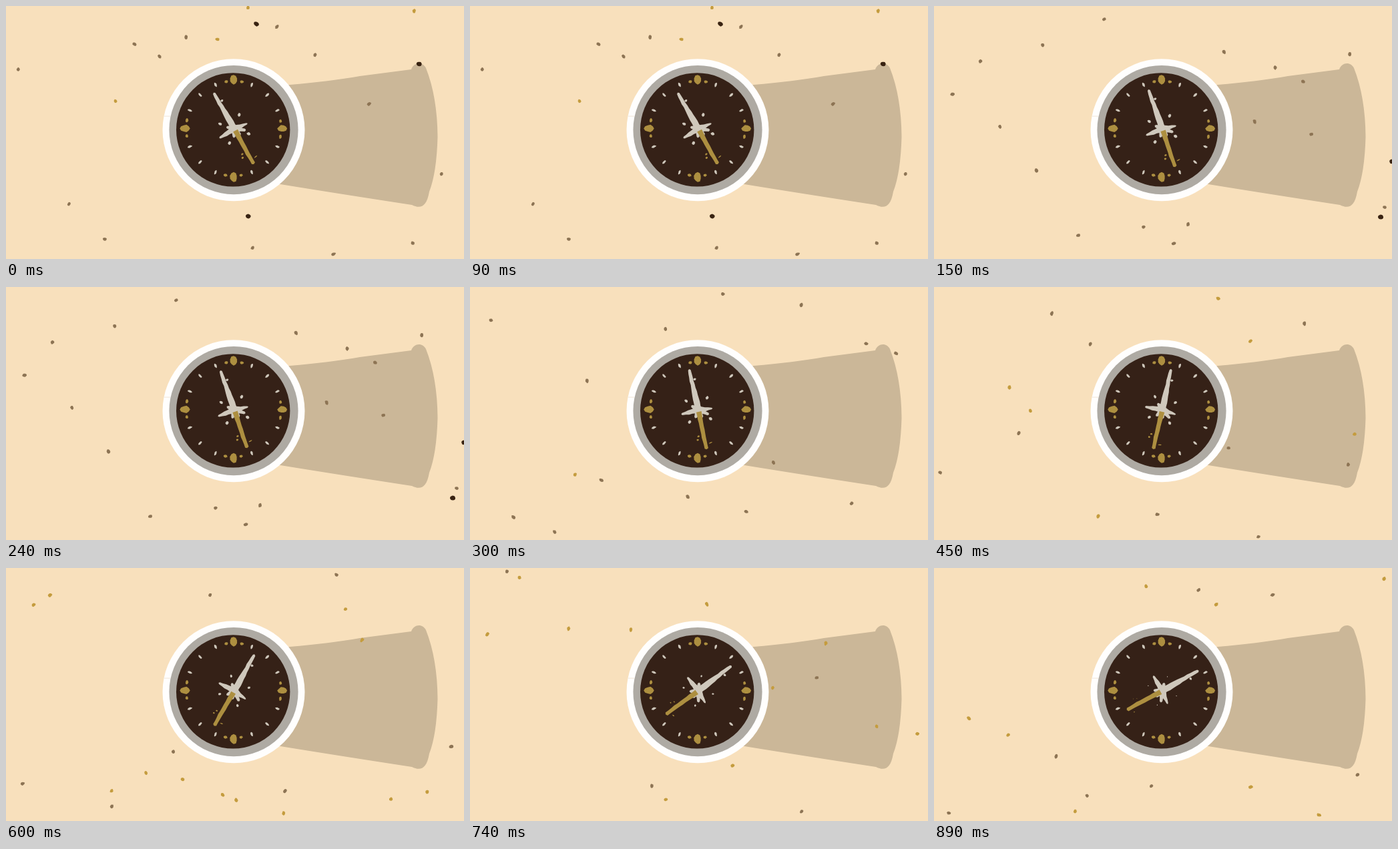
Recreate the animation shown at these times as an HTML page with a canvas. Size 686 by 379 pixels, loop 0.99 s.

```html
<!DOCTYPE html>
<html lang="en">
<head>
<meta charset="utf-8">
<title>Watch</title>
<style>
html, body { margin: 0; width: 100%; height: 100%; overflow: hidden; background: #f8e0bc; }
canvas { display: block; }
</style>
</head>
<body>
<canvas id="stage" width="686" height="379"></canvas>
<script>
const ctx = document.getElementById('stage').getContext('2d');
const W = 686, H = 379, LOOP = 990, TAU = Math.PI * 2;
const SAND = '#f8e0bc', SHADE = '#cbb798', SILVER = '#cfc8bc', GOLD = '#ad8f40';
const BROWN = '#8d7454', AMBER = '#c49c3e', DARK = '#392312';

// The hands jump from pose to pose; fresh grains are scattered with each one.
const poses = [
  { start: 0, angle: -28.8, brown: 13, amber: 4 },
  { start: 150, angle: -18.5, brown: 17, amber: 0 },
  { start: 300, angle: -11.8, brown: 14, amber: 1 },
  { start: 450, angle: 13, brown: 9, amber: 6 },
  { start: 600, angle: 30, brown: 7, amber: 12 },
  { start: 740, angle: 54, brown: 4, amber: 11 },
  { start: 890, angle: 61.7, brown: 7, amber: 8 },
];
poses[0].dark = [[375, 27], [619, 87], [363, 315]];
poses[1].dark = [[686, 233], [669, 316]];

const rad = deg => deg * Math.PI / 180;
const noise = n => {
  const s = Math.sin(n * 12.9898 + 4.1) * 43758.5453;
  return s - Math.floor(s);
};

function fill(points, color) {
  ctx.fillStyle = color;
  ctx.beginPath();
  for (const [x, y] of points) ctx.lineTo(x, y);
  ctx.fill();
}

function disc(x, y, r, color) {
  ctx.fillStyle = color;
  ctx.beginPath();
  ctx.arc(x, y, r, 0, TAU);
  ctx.fill();
}

// Uneven hand-painted dab.
function blob(x, y, rx, ry, turn, color) {
  const points = [], c = Math.cos(turn), s = Math.sin(turn);
  for (let i = 0; i < 10; i++) {
    const a = i * TAU / 10, k = 0.88 + 0.28 * noise(x * 3 + y * 7 + i);
    const u = Math.cos(a) * rx * k, v = Math.sin(a) * ry * k;
    points.push([x + u * c - v * s, y + u * s + v * c]);
  }
  fill(points, color);
}

// Rough-edged strip pointing away from the hub, tapering from half-width w0 to w1.
function limb(turn, from, to, w0, w1, color) {
  const left = [], right = [], steps = Math.ceil((to - from) / 6);
  for (let i = 0; i <= steps; i++) {
    const k = i / steps, y = -from - (to - from) * k, w = w0 + (w1 - w0) * k;
    left.push([-w - noise(turn + i) * 0.9, y]);
    right.unshift([w + noise(turn - i - 1) * 0.9, y]);
  }
  ctx.save();
  ctx.rotate(rad(turn));
  fill([...left, [0, -to - 1.5], ...right], color);
  ctx.restore();
}

// Spreads grains evenly across the stage, keeping clear of the watch.
function scatter(count, seed, color) {
  for (let i = 0; i < count; i++) {
    const x = W * (i + noise(seed + i)) / count;
    let y, tries = 0;
    do y = H * noise(seed + i * 7 + 31 * ++tries);
    while (Math.hypot(x - 341, y - 186) < 112);
    blob(x, y, 2.7 + noise(x) * 0.8, 2.4, noise(y) * 3, color);
  }
}

function drawShadow() {
  ctx.fillStyle = SHADE;
  ctx.beginPath();
  ctx.moveTo(400, 121);
  ctx.lineTo(425, 118);
  ctx.quadraticCurveTo(485, 113, 530, 105);
  ctx.lineTo(607, 95);
  ctx.bezierCurveTo(611, 84, 624, 83, 629, 93);
  ctx.quadraticCurveTo(646, 136, 646.5, 196);
  ctx.quadraticCurveTo(645, 250, 634, 278);
  ctx.bezierCurveTo(630, 302, 620, 304, 608, 298);
  ctx.quadraticCurveTo(497, 281, 411, 267);
  ctx.lineTo(390, 262);
  ctx.fill();
}

function drawDial() {
  disc(341, 185.8, 106.5, '#fffefd');
  ctx.fillStyle = '#f4ebdf';
  ctx.fillRect(236, 164.5, 10, 1.2);
  disc(341, 185.6, 96.6, '#aeaaa3');
  disc(340.2, 185.4, 85.2, '#352117');

  const mark = (deg, r, along, across, color) => {
    const a = rad(deg);
    blob(341 + r * Math.cos(a), 183.5 + r * Math.sin(a), along, across, a, color);
  };
  for (let i = 0; i < 16; i++) {
    const deg = i * 22.5;
    if (i % 4) {
      mark(deg, 71, 3.4, 1.6, SILVER);
      continue;
    }
    mark(deg, 73, 6.8, 5.3, GOLD);
    mark(deg - 9, 71, 2, 2.6, GOLD);
    mark(deg + 10, 71, 2, 3, GOLD);
  }
}

function drawHands({ start, angle }) {
  const dot = 2.7 * (1 - (start / LOOP) ** 3);
  ctx.save();
  ctx.translate(342, 184);
  ctx.rotate(rad(angle));

  limb(-1, 0, 61, 4.6, 1.6, SILVER);
  limb(-93, 0, 25, 4.5, 1.3, SILVER);
  limb(96, 0, 20, 4.5, 0.8, SILVER);
  limb(125, 0, 16, 4, 1.5, SILVER);
  limb(165, 0, 12, 4, 1.5, SILVER);
  limb(213, 0, 12, 4, 1.5, SILVER);
  limb(-48, 0, 11, 4, 1.5, SILVER);
  for (let i = 0; i < 4; i++) {
    const a = rad(48 + i * 90);
    blob(22.5 * Math.cos(a), 22.5 * Math.sin(a), dot, dot * 0.8, a, SILVER);
  }
  blob(4, -46, 2, 1.8, 0, SILVER);

  limb(180, 3, 59, 3.4, 2.4, GOLD);
  blob(-8, 39, dot * 0.65, dot * 0.5, 0, GOLD);
  blob(-10, 44, dot * 0.65, dot * 0.5, 0, GOLD);
  blob(8, 52, dot, 0.7, -0.2, GOLD);
  ctx.restore();
}

function draw() {
  const time = performance.now() % LOOP;
  const pose = poses.findLast(p => p.start <= time);
  ctx.fillStyle = SAND;
  ctx.fillRect(0, 0, W, H);
  drawShadow();
  scatter(pose.brown, pose.start + 1, BROWN);
  scatter(pose.amber, pose.start + 77, AMBER);
  for (const [x, y] of pose.dark ?? []) blob(x, y, 4, 3.2, 0.3, DARK);
  drawDial();
  drawHands(pose);
  requestAnimationFrame(draw);
}
draw();
</script>
</body>
</html>
```
